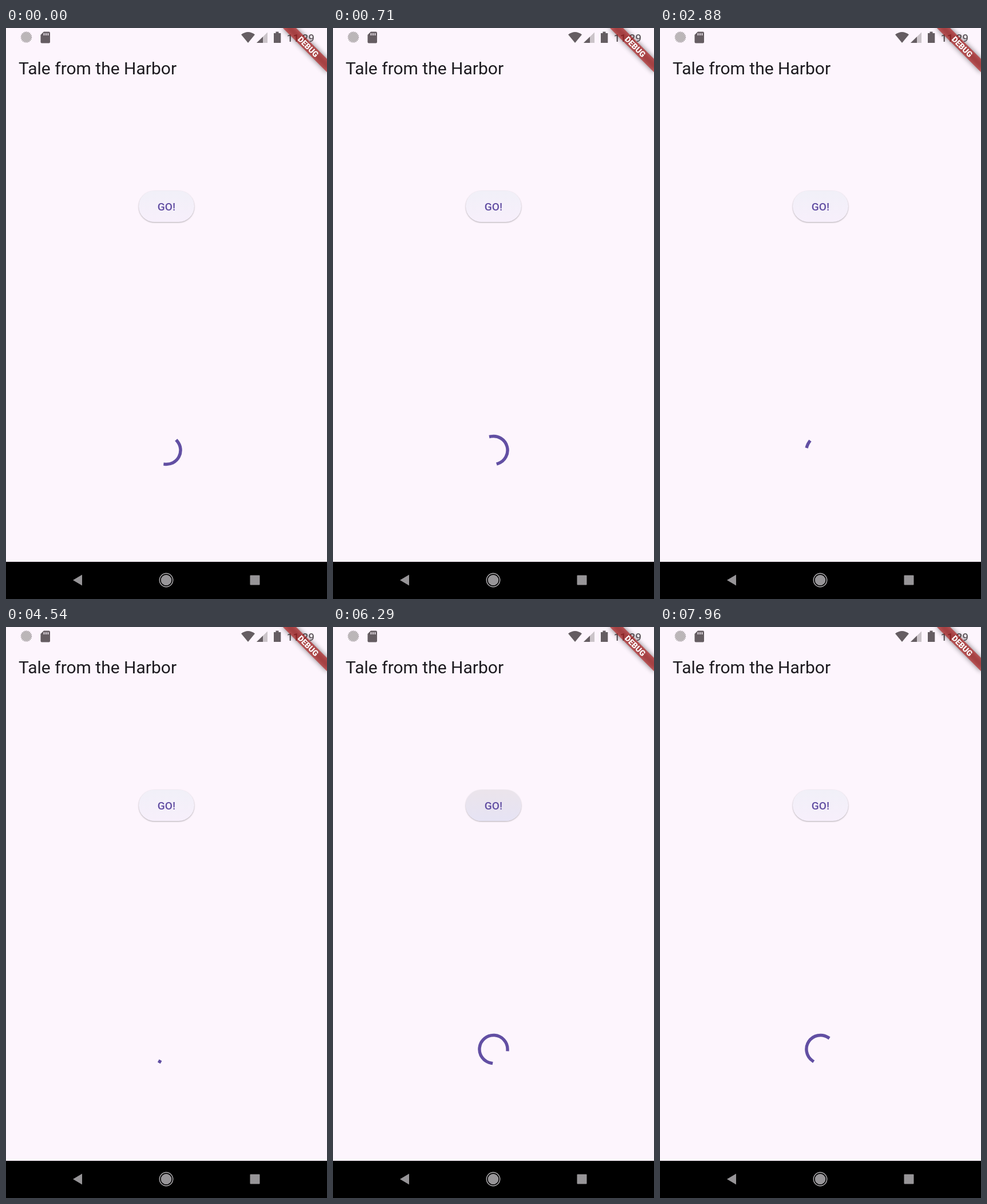
Animation of 561 by 998 pixels, one loop 8000 ms. Source, as an HTML page:

```html
<!DOCTYPE html>
<html lang="en">
<head>
<meta charset="utf-8">
<title>Loading screen</title>
<style>
  html, body { margin: 0; width: 100%; height: 100%; overflow: hidden; background: #fdf5fd; }
  svg { display: block; width: 100%; height: 100%; font-family: Roboto, sans-serif; }
  .label { font-weight: 500; font-size: 19.1px; text-anchor: middle; }
  .shadow { filter: drop-shadow(0 1.5px 1px rgba(0, 0, 0, .3)); }
  .blur { filter: blur(5px); }
</style>
</head>
<body>
<svg viewBox="0 0 561 998">
  <defs>
    <linearGradient id="idle" x2="0" y2="1">
      <stop offset="0" stop-color="#f1f0f8"/>
      <stop offset="1" stop-color="#f7effb"/>
    </linearGradient>
    <linearGradient id="active" x2="0" y2="1">
      <stop offset="0" stop-color="#ebe4eb"/>
      <stop offset="1" stop-color="#e6e3f4"/>
    </linearGradient>
  </defs>
  <rect width="561" height="998" fill="#fdf5fd"/>

  <!-- Status bar -->
  <g fill="#655d62">
    <circle cx="35.5" cy="16" r="8.5" fill="#bbb6b8"/>
    <circle cx="35.5" cy="16" r="9" fill="none" stroke="#8e888b" stroke-width="1.4" stroke-dasharray="1.4 1.4"/>
    <path d="M66 6.500H75Q77 6.500 77 8.500V24.500Q77 26.500 75 26.500H62.500Q60.500 26.500 60.500 24.500V12Z"/>
    <path d="M66.500 9V13M70 9V13M73.500 9V13" stroke="#fdf5fd" stroke-width="1.6"/>
    <path d="M411 11.500Q423 2.500 435 11.500L423 26Z"/>
    <path d="M438 26L457 7.500V26Z" fill="#cbc4c9"/>
    <path d="M438 26L449 15.300V26Z"/>
    <path d="M468 9H471.500V6.500H476.500V9H480.300V26H468Z"/>
    <text class="label" x="515" y="23.500">11:29</text>
  </g>

  <text x="22" y="80.500" font-size="30" fill="#1d1b20">Tale from the Harbor</text>

  <!-- Button -->
  <rect class="shadow" x="232" y="284.500" width="97" height="54.500" rx="27.250" fill="url(#idle)"/>
  <rect id="press" x="232" y="284.500" width="97" height="54.500" rx="27.250" fill="url(#active)"/>
  <text class="label" x="280.500" y="318.700" fill="#624fa3" letter-spacing=".14">GO!</text>

  <path id="spinner" fill="none" stroke="#624fa3" stroke-width="5.450" stroke-linecap="square"/>

  <!-- Corner banner -->
  <g transform="translate(561 0) rotate(45)">
    <rect class="blur" x="-54.500" y="38.200" width="109" height="16.400" fill="#000" opacity=".5"/>
    <rect x="-54.500" y="38.200" width="109" height="16.400" fill="#b71c1c" opacity=".63"/>
    <text x="0" y="51.300" font-size="13.900" font-weight="900" text-anchor="middle" fill="#fff">DEBUG</text>
  </g>

  <!-- Navigation bar -->
  <rect y="933" width="561" height="65" fill="#000"/>
  <g fill="#979598">
    <path d="M117 965L133 955.500V974.500Z"/>
    <circle cx="280" cy="965" r="9.300"/>
    <circle cx="280" cy="965" r="11.700" fill="none" stroke="#b5b3b6" stroke-width="1.400"/>
    <rect x="426.500" y="956.500" width="17" height="17" rx="1"/>
  </g>
</svg>
<script>
const LOOP = 8000;
const CYCLE = 1333, TURN = 2222;             // arc growth and rotation periods, ms
const CYCLE_PHASE = 0.673, TURN_PHASE = 0.597;
const STALL = [4415, 4565];                  // the spinner hangs briefly, then catches up
const CENTER = [280.5, 738], RADIUS = 24.55;

const spinner = document.getElementById('spinner');
const press = document.getElementById('press');
const clamp = v => Math.min(1, Math.max(0, v));

// cubic-bezier(.4, 0, .2, 1), solved by bisection
function ease(x) {
  let low = 0, high = 1;
  for (let i = 0; i < 20; i++) {
    const s = (low + high) / 2, r = 1 - s;
    if (1.2 * s * r * r + 0.6 * s * s * r + s ** 3 < x) low = s;
    else high = s;
  }
  return low * low * (3 - 2 * low);
}

function arcPath(start, sweep) {
  const point = a => [CENTER[0] + RADIUS * Math.cos(a), CENTER[1] + RADIUS * Math.sin(a)]
    .map(v => v.toFixed(3)).join(' ');
  return `M${point(start)}A${RADIUS} ${RADIUS} 0 ${+(sweep > Math.PI)} 1 ${point(start + sweep)}`;
}

function draw(t) {
  const time = t > STALL[0] && t < STALL[1] ? STALL[0] : t;
  const cycle = (time / CYCLE + CYCLE_PHASE) % 1;
  const turn = time / TURN + TURN_PHASE;
  const head = ease(clamp(cycle * 2));
  const tail = ease(clamp(cycle * 2 - 1));
  const start = Math.PI * (-0.5 + 1.5 * tail + 2 * turn + 0.5 * cycle);
  spinner.setAttribute('d', arcPath(start, Math.max(1.5 * Math.PI * (head - tail), 0.002)));
  press.setAttribute('opacity', clamp((t - 4600) / 200) * clamp((7500 - t) / 200));
}

function tick() {
  draw(performance.now() % LOOP);
  requestAnimationFrame(tick);
}
tick();
</script>
</body>
</html>
```
